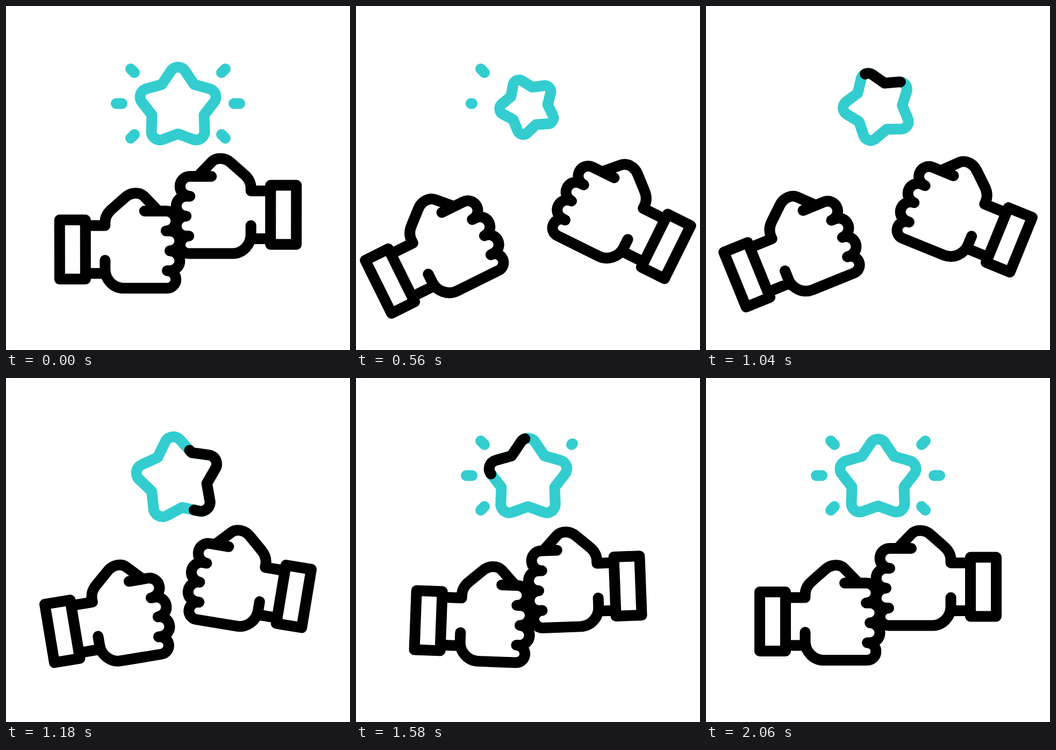
Write an HTML page that moves like this. It is 640 px wide and 640 px high and loops after 3600 ms.

```html
<!DOCTYPE html>
<html lang="en">
<head>
<meta charset="utf-8">
<title>Fist bump</title>
<style>
  html, body { margin: 0; width: 100%; height: 100%; overflow: hidden; background: #fff; }
  svg { display: block; width: 100%; height: 100%; }
  path { fill: none; stroke-width: 20; stroke-linecap: round; stroke-linejoin: round; }
  .ink { stroke: #000; }
  .teal { stroke: #33cdcf; }
</style>
</head>
<body>
<svg viewBox="0 0 640 640">
  <g id="rays"></g>
  <path id="star" class="teal"/>
  <path id="glint" class="ink" pathLength="1"/>
  <g id="left"></g>
  <g transform="translate(640 -64.5) scale(-1 1)"><g id="right"></g></g>
</svg>
<script>
const LOOP = 3600, PEAK = 740, HIT = 1550, REST = 2060;
const $ = id => document.getElementById(id);
const set = (el, name, value) => el.setAttribute(name, value);
function addPath(parent, cls) {
  const el = document.createElementNS("http://www.w3.org/2000/svg", "path");
  set(el, "class", cls);
  parent.append(el);
  return el;
}

const clamp = v => Math.min(1, Math.max(0, v));
const span = (t, a, b) => clamp((t - a) / (b - a));
const inOut = (p, n) => p < .5 ? (2 * p) ** n / 2 : 1 - (2 - 2 * p) ** n / 2;
const sineOut = p => Math.sin(clamp(p) * Math.PI / 2);
const sineInOut = p => (1 - Math.cos(p * Math.PI)) / 2;

// 0 -> 1 when pulling back, 1 -> over on the bump, then back to 0
function swing(t, over, outEnd = PEAK, hit = HIT) {
  if (t < PEAK) return sineOut(t / outEnd);
  if (t < hit) return 1 - (1 - over) * inOut(span(t, PEAK, hit), 3);
  return over * (1 - sineInOut(span(t, hit, REST)));
}

// Rays in drawing order, each from its inner end outwards
const rays = [
  [239, 124, 232, 117], [216, 181.5, 205, 181.5], [239, 239, 232, 246],
  [401, 124, 408, 117], [424, 181.5, 435, 181.5], [401, 239, 408, 246]
].map(ends => ({ el: addPath($("rays"), "teal"), ends }));

function drawRays(t) {
  const shown = 6 * (t < 1000 ? 1 - inOut(span(t, 0, 820), 2) : inOut(span(t, 1210, 1920), 2));
  rays.forEach(({ el, ends: [x, y, x2, y2] }, i) => {
    const k = clamp(shown - i);
    set(el, "d", k ? `M${x} ${y}L${x + (x2 - x) * k} ${y + (y2 - y) * k}` : "");
  });
}

function starPath(scale, turn) {
  const inner = 51, tip = 85.6, cut = .46;
  const at = (r, deg) => {
    const a = (deg + turn) * Math.PI / 180;
    return [320 + r * scale * Math.sin(a), 187 - r * scale * Math.cos(a)];
  };
  const mix = (a, b) => a.map((v, i) => v + (b[i] - v) * cut);
  const r = 15.8 * scale;
  let d = "M" + at(inner, -36);
  for (let deg = 0; deg < 360; deg += 72) {
    const top = at(tip, deg), left = at(inner, deg - 36), right = at(inner, deg + 36);
    d += `L${mix(top, left)}A${r} ${r} 0 0 1 ${mix(top, right)}`;
    if (deg < 288) d += "L" + right;
  }
  return d + "Z";
}

function starScale(t) {
  if (t < 780) return 1 - .3 * sineOut(t / PEAK);
  if (t < 1310) return .7 + .39 * inOut(span(t, 780, 1310), 3);
  return 1.09 - .09 * sineInOut(span(t, 1310, 1720));
}

function drawStar(t) {
  const s = swing(t, 0, PEAK, 1500);
  const d = starPath(starScale(t), -27.5 * (t < PEAK ? s * s : s));
  set($("star"), "d", d);

  const head = inOut(span(t, 800, 1590), 2), tail = inOut(span(t, 980, 1880), 2);
  const len = head - tail;
  set($("glint"), "d", len > .001 ? d : "");
  set($("glint"), "stroke-dasharray", `${len} ${1 - len}`);
  set($("glint"), "stroke-dashoffset", -(tail + .088));
}

// reach: how far the fist overshoots; give: how far the cuff closes up on it
const arms = [
  { id: "left", reach: -.17, give: 0 },
  { id: "right", reach: -.09, give: -.5 }
].map(arm => ({ ...arm, el: $(arm.id), cuff: addPath($(arm.id), "ink"), hand: addPath($(arm.id), "ink") }));

function drawArm(t, { el, cuff, hand, reach, give }) {
  const turn = swing(t, -.076);
  const drop = t < PEAK ? turn ** 3 : swing(t, .1, PEAK, 1350);
  const x = 210 - 63.3 * swing(t, reach, 600);
  const y = 450 + 21 * drop;
  set(el, "transform", `translate(${x} ${y}) rotate(${-28.4 * turn}) translate(-210 -450)`);

  const slide = 9.8 * swing(t, give);
  const push = 5.3 * swing(t, -2);
  const knuckle = "a18.5 18.5 0 0 1 0 37";
  set(cuff, "d", `M${100 - slide} 398h48v110h-48Z`);
  set(hand, "d",
    `M${148 - slide} 408.5H184.5V403C184.5 393 190 384 197 378L222 356C233 346 249 346 257 354L283 381` +
    `M258 381.5H${298 + push}${knuckle}H${305 + push}${knuckle}${knuckle}H${300 + push}` +
    `a16.25 16.25 0 0 1 0 32.5H219C200 525 184.5 509 184.5 490V473` +
    `M${148 - slide} 497.5H185`);
}

function draw(t) {
  drawRays(t);
  drawStar(t);
  arms.forEach(arm => drawArm(t, arm));
}

const start = performance.now();
function tick() {
  draw((performance.now() - start) % LOOP);
  requestAnimationFrame(tick);
}
draw(0);
requestAnimationFrame(tick);
</script>
</body>
</html>
```
